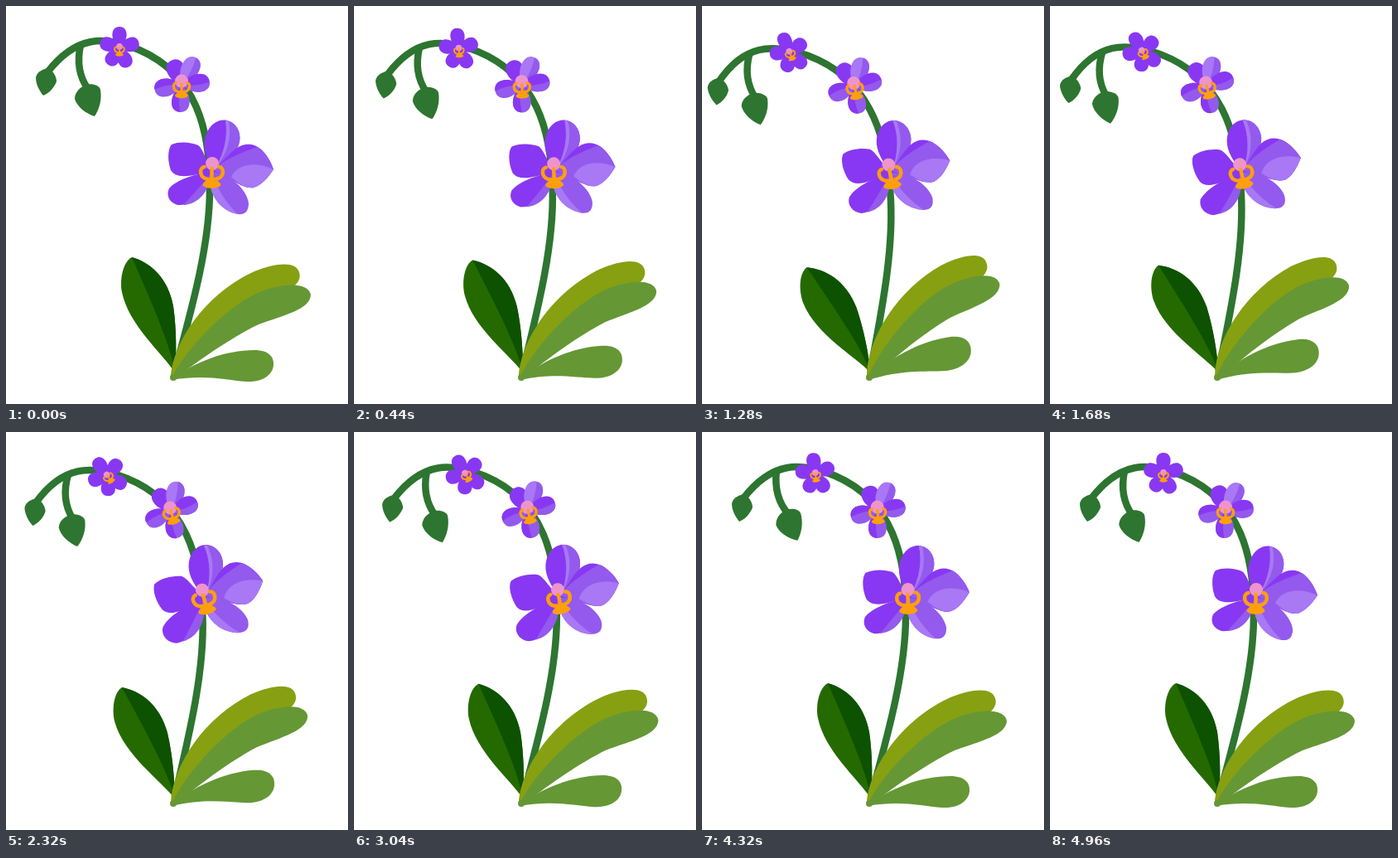
Recreate the animation shown at these times as an HTML page. Size 413 by 480 pixels, loop 5 s.

```html
<!DOCTYPE html>
<html lang="en">
<head>
<meta charset="utf-8">
<title>Swaying orchid</title>
<style>
html, body { margin: 0; width: 100%; height: 100%; overflow: hidden; background: #fff; }
svg { display: block; width: 100%; height: 100%; }
.stem { fill: none; stroke: #2d7530; stroke-width: 8.5; }
.bud { fill: #2d7530; }
.dark { fill: #8838f2; }
.mid { fill: #935aed; }
.light { fill: #a878f5; }
.green { fill: #659735; }
.olive { fill: #86a012; }
.lip { fill: #ff9f0c; }
.arm { fill: none; stroke: #ff9f0c; stroke-width: 4.5; stroke-linecap: round; }
.pink { fill: #ee94cc; }
</style>
</head>
<body>
<svg viewBox="0 0 413 480">
  <defs>
    <g id="lip">
      <path class="arm" d="M-9 -5C-15 -4 -15 6 -8 9L-2 11M9 -5C15 -4 15 6 8 9L2 11M0 -3V10"/>
      <path class="lip" d="M-6 8H6C5 13 11 13 11 17C8 22 -8 22 -11 17C-11 13 -5 13 -6 8Z"/>
    </g>
  </defs>

  <g id="stalk">
    <path class="stem" d="M204 440C223 370 246 290 246 222C247 150 230 83 161 53C118 35 84 36 50 80"/>
    <path class="bud" d="M51 75C58 79 61 86 61 91C58 99 52 105 45 108C39 101 36 93 36 86C38 78 46 76 51 75Z"/>
    <g id="bud">
      <path class="stem" d="M90 47C85 70 89 86 99 100"/>
      <path class="bud" d="M97 95C104 93 113 96 114 101C116 112 113 124 107 133C97 130 86 122 83 112C83 104 89 98 97 95Z"/>
    </g>
    <g id="small"></g>
    <g id="medium"></g>
    <g id="large">
      <circle class="dark" cx="248" cy="201" r="11"/>
      <path class="dark" d="M248 196C240 180 237 166 242 154C247 142 257 136 267 138C279 141 284 153 282 164C279 178 266 188 252 197Z"/>
      <path class="mid" d="M265 138C279 140 284 153 282 164C279 178 266 188 252 197C264 177 268 157 265 138Z"/>
      <path class="light" d="M265 138L269 139C273 158 268 178 252 197C264 177 268 157 265 138Z"/>
      <path class="dark" d="M250 198C260 190 270 176 281 170C290 165 299 166 307 172C315 179 320 188 323 197C317 206 309 216 299 219C285 221 272 207 250 198Z"/>
      <path class="mid" d="M250 198C262 186 280 178 304 170C314 177 320 188 323 197C317 206 309 216 299 219C285 221 272 207 250 198Z"/>
      <path class="light" d="M272 206C280 190 302 187 323 197C317 206 309 216 299 219C287 220 279 212 272 206Z"/>
      <path class="mid" d="M250 200C272 203 291 222 293 238C293 247 289 252 280 251C262 248 245 231 246 206Z"/>
      <path class="light" d="M249 202C256 222 266 238 280 251C262 248 245 231 246 206Z"/>
      <g id="lower">
        <path class="dark" d="M249 200C229 202 205 210 197 220C193 228 197 237 207 240C229 241 245 224 249 200Z"/>
        <path class="mid" d="M249 200C238 214 225 228 214 240C233 239 245 224 249 200Z"/>
      </g>
      <g id="upper">
        <path class="dark" d="M249 198C240 184 238 172 232 168C223 164 209 163 200 167C195 173 195 187 199 198C204 206 216 209 249 198Z"/>
      </g>
      <circle class="pink" cx="249" cy="190" r="8"/>
      <use href="#lip" x="248.5" y="199"/>
    </g>
  </g>

  <g id="leafL">
    <path fill="#256a00" d="M152 303C174 309 196 328 202 362C206 390 206 420 204 442C190 420 148 385 140 345C137 328 142 308 152 303Z"/>
    <path fill="#0d5200" d="M152 303C174 309 196 328 202 362C206 390 206 420 204 442C200 410 168 340 152 303Z"/>
  </g>
  <g id="leafR">
    <path class="olive" d="M199 447C203 400 245 345 300 320C325 310 350 307 354 321C358 334 345 340 330 350L200 449Z"/>
    <path class="green" d="M200 449C214 418 262 366 302 347C325 336 364 330 368 348C368 366 335 373 305 384C272 400 238 424 214 442L202 451Z"/>
  </g>
  <g id="leafB">
    <path class="green" d="M200 451C225 430 265 415 300 415C318 415 324 424 323 433C322 446 308 454 290 453C265 451 240 444 200 451Z"/>
  </g>
  <circle class="green" cx="202" cy="448" r="4"/>
</svg>

<script>
const LOOP = 5000, STEP = 40;
const $ = id => document.getElementById(id);

// Lean of the whole plant (0 upright, 1 furthest left) and swing of the hanging bud in degrees.
const LEAN = [[0, 0], [560, .42], [1120, .87], [1360, 1], [1680, .8], [2280, .47], [2800, .17], [3080, .05], [3400, 0], [5000, 0]];
const SWING = [[0, 0], [880, 5], [1800, 8.8], [2320, 6], [3040, -1], [3720, -8.7], [5000, 0]];

// Smooth curve through keys; tangents vanish at peaks.
function curve(keys, t) {
  const slope = i => {
    if (i < 1 || i > keys.length - 2) return null;
    const [a, b, c] = [keys[i - 1], keys[i], keys[i + 1]];
    if ((b[1] - a[1]) * (c[1] - b[1]) <= 0) return 0;
    return (c[1] - a[1]) / (c[0] - a[0]);
  };
  let i = 0;
  while (i < keys.length - 2 && t >= keys[i + 1][0]) i++;
  const [t0, v0] = keys[i], [t1, v1] = keys[i + 1];
  const d = t1 - t0, u = (t - t0) / d, chord = (v1 - v0) / d;
  const m0 = (slope(i) ?? chord) * d, m1 = (slope(i + 1) ?? chord) * d;
  const u2 = u * u, u3 = u2 * u;
  return v0 * (2 * u3 - 3 * u2 + 1) + m0 * (u3 - 2 * u2 + u) + v1 * (3 * u2 - 2 * u3) + m1 * (u3 - u2);
}

function petal(angle, len, w, base, edge) {
  const right = `C${w} ${-len} ${w} ${-len * .35} 0 0`;
  const left = `M0 0C${-w} ${-len * .35} ${-w} ${-len} 0 ${-len}`;
  let out = `<path class="${base}" d="${left}${right}Z"/>`;
  if (edge) out += `<path class="${edge}" d="M0 0Q${w * .3} ${-len * .5} 0 ${-len}${right}Z"/>`;
  return `<g transform="rotate(${angle})">${out}</g>`;
}

function bloom(id, x, y, petals, w, pinkR, lipScale) {
  const body = petals.map(([angle, len, base, edge]) => petal(angle, len, w, base, edge)).join('');
  $(id).innerHTML = `<g transform="translate(${x} ${y})">
    <circle class="dark" r="${pinkR}"/>${body}
    <circle class="pink" cy="${-pinkR * .55}" r="${pinkR}"/>
    <use href="#lip" transform="translate(0 ${pinkR * .15}) scale(${lipScale})"/></g>`;
}

bloom('medium', 212, 95, [
  [-21, 32, 'dark'], [28, 37, 'light', 'mid'], [84, 34, 'dark', 'mid'],
  [183, 33, 'mid', 'dark'], [260, 33, 'mid', 'dark']
], 14.5, 8, .72);
bloom('small', 137, 51, [
  [0, 26, 'dark'], [72, 24.5, 'dark'], [154, 25, 'dark'], [214, 24, 'dark'], [289, 24.5, 'dark']
], 11.5, 3.8, .44);

const turn = (id, deg, x, y, { dx = 0, dy = 0, size = 1 } = {}) =>
  $(id).setAttribute('transform',
    `translate(${x + dx} ${y + dy}) rotate(${deg}) scale(${size}) translate(${-x} ${-y})`);

function draw(t) {
  const s = curve(LEAN, t);
  const p = t / LOOP;
  const spin = ((1 - Math.cos(2 * Math.PI * p)) / 2 + 1 - Math.abs(2 * p - 1)) / 2;

  const a = -4.85 * s * Math.PI / 180, c = Math.cos(a), n = Math.sin(a);
  $('stalk').setAttribute('transform',
    `translate(203 447) matrix(${c} ${n + .04 * s} ${-n} ${c - .01 * s} 0 0) translate(-203 -447)`);

  turn('bud', curve(SWING, t), 90, 48);
  turn('large', -13.5 * spin, 249, 198, { dx: -1.2 * s });
  turn('upper', -4 * spin, 249, 198, { size: 1 + .06 * spin });
  turn('lower', 0, 249, 200, { size: 1 + .12 * spin });
  turn('medium', -13.5 * spin, 212, 95, { dx: 1.5 * s, dy: -2 * s });
  turn('small', -35 * spin, 137, 51, { dx: 2 * s, dy: -2.5 * s });
  turn('leafL', -11 * s, 204, 445);
  turn('leafR', -4.7 * s, 202, 448);
  turn('leafB', -8.4 * s, 202, 448, { size: 1 + .045 * s });
}

const start = performance.now();
function tick() {
  const t = (performance.now() - start) % LOOP;
  draw(Math.floor(t / STEP) * STEP);
  requestAnimationFrame(tick);
}
tick();
</script>
</body>
</html>
```
